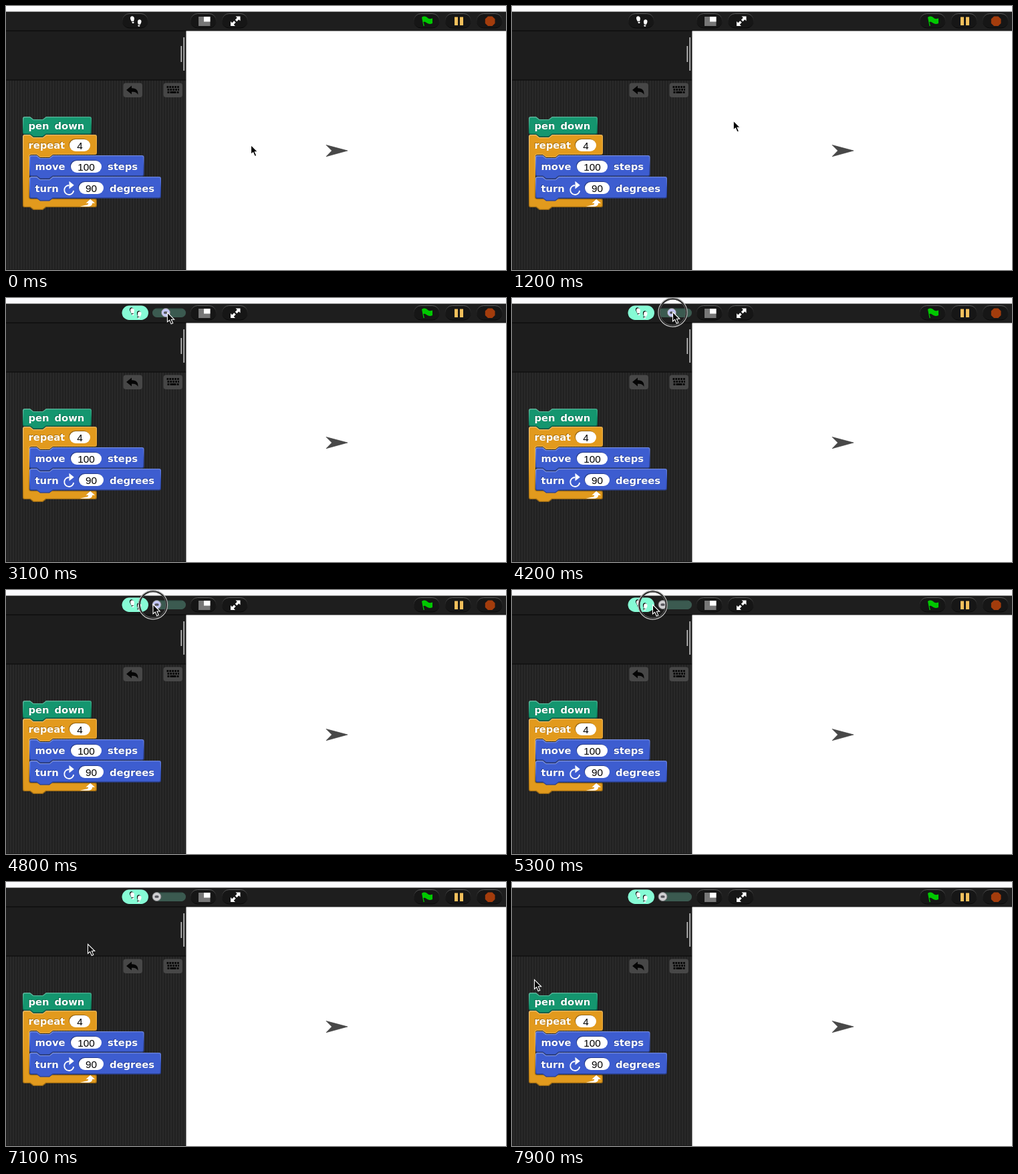
Write an HTML page that moves like this. It is 748x396 px and loops after 8 s.

```html
<!DOCTYPE html>
<html lang="en">
<head>
<meta charset="utf-8">
<title>Visible stepping</title>
<style>
  html, body { margin: 0; width: 100%; height: 100%; overflow: hidden; background: #fff; }
  svg { display: block; width: 748px; height: 396px; }
  .label { font: bold 14.7px "DejaVu Sans", sans-serif; fill: #fff; word-spacing: 3px; }
  .num { font: 15.3px "Liberation Sans", sans-serif; fill: #000; text-anchor: middle; }
  .tip { font: italic 10.2px "Liberation Sans", sans-serif; fill: #000; stroke: #000; stroke-width: .15; }
</style>
</head>
<body>
<svg id="stage" viewBox="0 0 748 396">
  <defs>
    <pattern id="stripes" width="4" height="4" patternUnits="userSpaceOnUse">
      <rect width="4" height="4" fill="#292929"/><rect width="2" height="4" fill="#212121"/>
    </pattern>
    <linearGradient id="rim" x2="0" y2="1">
      <stop stop-color="#5c5c5c"/><stop offset=".3" stop-color="#2c2c2c"/>
      <stop offset=".7" stop-color="#161616"/><stop offset="1" stop-color="#080808"/>
    </linearGradient>
    <linearGradient id="bevel" x2=".25" y2="1">
      <stop stop-color="#fff" stop-opacity=".38"/><stop offset=".45" stop-color="#fff" stop-opacity=".1"/>
      <stop offset=".65" stop-color="#000" stop-opacity=".12"/><stop offset="1" stop-color="#000" stop-opacity=".35"/>
    </linearGradient>
  </defs>

  <rect width="748" height="9" fill="#fbfbfd"/>
  <rect y="8.5" width="748" height="29.5" fill="#1e1e1e"/>
  <rect y="36.5" width="270" height="1.5" fill="#0e0e0e"/>
  <rect y="38" width="270" height="73" fill="#1d1d1d"/>
  <rect y="111" width="270" height="285" fill="url(#stripes)"/>
  <path d="M0 111H270" stroke="#101010" stroke-width="1.5"/>
  <path d="M0 395.5H270" stroke="#1b1b1b"/>
  <rect x="269.5" y="37.5" width="479" height="359" fill="#fff"/>
  <path d="M262.3 60V84M266.2 47V97" stroke="#bdbdbd" stroke-width="1.7"/>

  <g id="buttons"></g>
  <rect id="active" x="173.5" y="11.5" width="39.5" height="21.5" rx="10.7" fill="#86fbd5"/>
  <g id="slider">
    <rect x="219" y="15.5" width="50" height="13.5" rx="6.7" fill="#3b5a50"/>
    <path d="M225 15.8H263" stroke="#263a34"/>
    <g id="knob">
      <circle r="6.5" fill="#cfcfd2" stroke="#77777a"/>
      <circle id="shine" r="5.8" fill="#c3c7f6"/>
      <rect x="-3" y="-1.8" width="6" height="3.6" rx="1.6" fill="#55555c"/>
    </g>
  </g>

  <g id="feet" fill="#fff">
    <g id="footShade" fill="#000" transform="translate(-1 -1)"></g>
    <g id="foot">
      <path d="M186 18C186 14.5 191 14 191.8 18C192 20 191.5 21.5 191 23L188 23.3C187 21.5 186 20 186 18ZM188.2 24.2L191.3 23.8C192.4 26.3 189 27.2 188.2 24.2Z"/>
      <path d="M197 23C197.4 19 202.5 19.5 202.5 23C202.5 25 201.5 26.5 200.8 28L197.9 27.6C197.3 26 196.8 25 197 23ZM197.5 28.5L200.5 28.9C200 32 196.5 31 197.5 28.5Z"/>
    </g>
  </g>
  <rect x="288" y="16" width="17.5" height="14" fill="#777"/>
  <rect x="296" y="16" width="9.5" height="7.5" fill="#fff"/>
  <path d="M350.5 15.5V22.5L348.3 20.3L345.3 23.3L342.8 20.8L345.8 17.8L343.5 15.5ZM336 30V23L338.2 25.2L341.2 22.2L343.7 24.7L340.7 27.7L343 30Z" fill="#fff"/>
  <path d="M622 17C626 14 629 16 631 18C633 19.5 635 19.5 638 18.5V26C634 28 631 26.5 629 25C627 23.6 625.5 23.6 624.5 24.2L626 30H624.5Z" fill="#00c800"/>
  <path d="M671 16.5H676V29H671ZM679 16.5H684V29H679Z" fill="#f2c05c"/>
  <path d="M721 15.5H727.4L731.5 19.6V26L727.4 30H721L716.8 26V19.6Z" fill="#a33c0c"/>

  <rect x="175.5" y="115.5" width="28.5" height="21.5" rx="4" fill="#474747"/>
  <path d="M180 126L188 119.5V123.3C195 123 198 127 197.5 133C195.5 129.5 193 128.6 188 128.8V132.5Z" fill="#050505"/>
  <rect x="235.5" y="115.5" width="28.5" height="21.5" rx="4" fill="#474747"/>
  <g stroke="#080808" stroke-width="2.8">
    <path d="M240.5 121.5H259.5M241.5 125.5H259" stroke-dasharray="2.7 1.2"/>
    <path d="M241.5 129.5H244.3M245.5 129.5H254.5M255.7 129.5H258.5"/>
  </g>

  <g id="blocks"></g>
  <path d="M101.2 277A7 7 0 1 1 94.2 269" fill="none" stroke="#fff" stroke-width="1.8"/>
  <path d="M94.5 262.8L101.8 268.8L94.5 274.6Z" fill="#fff"/>
  <path d="M110.5 300.8H122C127 300.8 129 299 129 295.7H133L126.2 289.8L119.5 295.7H123.2C123.2 297.6 122 298.5 119 298.7Z" fill="#fff"/>

  <path d="M479 208.5L511 217L479 225.8L487.5 217Z" fill="#484848" stroke="#333" stroke-width=".6"/>

  <g id="bubble" transform="translate(0 .5)">
    <path d="M213 11H284.5Q290.5 11 290.5 17V21Q290.5 27 284.5 27H217L208 33.5L211 26.8Q207 26 207 21V17Q207 11 213 11Z" fill="#f4f4f4" stroke="#8c8c8c"/>
    <text class="tip" x="213" y="22.3">Visible stepping</text>
  </g>
  <g id="ring" fill="none">
    <circle r="20.5" stroke="#111" stroke-width="3"/>
    <circle r="21.6" stroke="#c4c4c4" stroke-width="1.2"/>
    <circle r="19.4" stroke="#8a8a8a" stroke-width=".7"/>
  </g>
  <path id="cursor" d="M0 0V14L3.2 11.2L5.7 17L8.3 15.9L5.8 10.3H10.2Z" fill="#000" stroke="#fff" stroke-width="1.1"/>
</svg>
<script>
const $ = id => document.getElementById(id);

// Toolbar
$('buttons').innerHTML = [174, 276, 323, 610, 657, 704].map(x =>
  `<rect x="${x}" y="11.5" width="38.5" height="21.5" rx="10.7" fill="#161616" stroke="url(#rim)"/>`).join('');
$('footShade').innerHTML = $('foot').innerHTML;

// Block outlines: notch on the upper edge, nub on the lower edge
const notch = (x, y) => `H${x + 11}L${x + 16} ${y + 4}H${x + 30}L${x + 35} ${y}`;
const nub = (x, y) => `H${x + 35}L${x + 30} ${y + 4}H${x + 16}L${x + 11} ${y}`;
const start = (x, y) => `M${x} ${y + 3}Q${x} ${y} ${x + 3} ${y}` + notch(x, y);
const right = (r, y, b) => `H${r - 3}Q${r} ${y} ${r} ${y + 3}V${b - 3}Q${r} ${b} ${r - 3} ${b}`;
const finish = (x, b) => nub(x, b) + `H${x + 3}Q${x} ${b} ${x} ${b - 3}Z`;
const command = (x, y, r, b) => start(x, y) + right(r, y, b) + finish(x, b);
const loop = start(25, 193) + right(136, 193, 223) + nub(35, 223) +
  'H38Q35 223 35 226V286Q35 289 38 289' + right(136, 289, 302) + finish(25, 302);

// The bevel is clipped so that it stays inside the outline
const block = (id, d, color) =>
  `<clipPath id="${id}"><path d="${d}"/></clipPath><path d="${d}" fill="${color}"/>` +
  `<path d="${d}" clip-path="url(#${id})" fill="none" stroke="url(#bevel)" stroke-width="2.6"/>`;
const label = (x, y, s) =>
  `<text class="label" x="${x - 1}" y="${y - 1}" style="fill:#0004">${s}</text><text class="label" x="${x}" y="${y}">${s}</text>`;
const slot = (x, y, w, n) =>
  `<rect x="${x - 1}" y="${y - 1}" width="${w}" height="18" rx="9" fill="#0005"/>` +
  `<rect x="${x}" y="${y}" width="${w}" height="18" rx="9" fill="#fff"/>` +
  `<text class="num" x="${x + w / 2}" y="${y + 14.5}">${n}</text>`;

$('blocks').innerHTML =
  block('loop', loop, '#e29a1d') +
  block('pen', command(25, 166, 128, 192.5), '#14966f') +
  block('turn', command(35, 256, 232, 288.5), '#3d5dd0') +
  block('move', command(35, 224, 206.5, 255.5), '#3d5dd0') +
  label(33.5, 185, 'pen down') +
  label(33.5, 214, 'repeat') + slot(95, 200, 31, 4) +
  label(43.5, 246, 'move') + slot(97, 232, 46, 100) + label(152, 246, 'steps') +
  label(43.5, 278.5, 'turn') + slot(109, 264, 37, 90) + label(155, 278.5, 'degrees');

// Pointer stops: time, x, y
const route = [
  [1000, 366.5, 208.5], [1700, 188.5, 24.5], [2400, 188.5, 24.5], [3000, 241.5, 22],
  [3500, 240.5, 21], [4300, 240.5, 21], [5100, 210.5, 22], [5400, 210.5, 22],
  [6000, 211.5, 40], [6400, 211.5, 40], [7800, 33.5, 146.5]
];
const clamp = (v, a, b) => Math.min(b, Math.max(a, v));

function pointer(t) {
  if (t <= route[0][0]) return route[0].slice(1);
  for (let i = 1; i < route.length; i++) {
    const [t0, x0, y0] = route[i - 1], [t1, x1, y1] = route[i];
    if (t < t1) {
      const p = (t - t0) / (t1 - t0), e = p * p * (3 - 2 * p);
      return [x0 + (x1 - x0) * e, y0 + (y1 - y0) * e];
    }
  }
  return route[route.length - 1].slice(1);
}

const show = (id, on) => $(id).setAttribute('visibility', on ? 'visible' : 'hidden');
const move = (id, x, y) => $(id).setAttribute('transform', `translate(${x.toFixed(2)} ${y.toFixed(2)})`);

function draw(ms) {
  const t = Math.floor(ms / 100) * 100;
  const [x, y] = pointer(t);
  const stepping = t >= 2300;
  const pressed = (t >= 2100 && t < 2300) || (t >= 3400 && t < 6300);
  const knob = t < 4300 ? 239 : clamp(x - 1.5, 225.5, 239);

  move('cursor', x, y);
  move('ring', x, y + 0.5);
  move('knob', knob, 22);
  show('ring', pressed);
  show('bubble', t >= 1800 && t < 2100);
  show('active', stepping);
  show('footShade', stepping);
  $('slider').style.display = stepping ? '' : 'none';
  show('shine', t >= 2900 && t < 4900);
}

const origin = performance.now();
function tick() {
  draw((performance.now() - origin) % 8000);
  requestAnimationFrame(tick);
}
tick();
</script>
</body>
</html>
```
